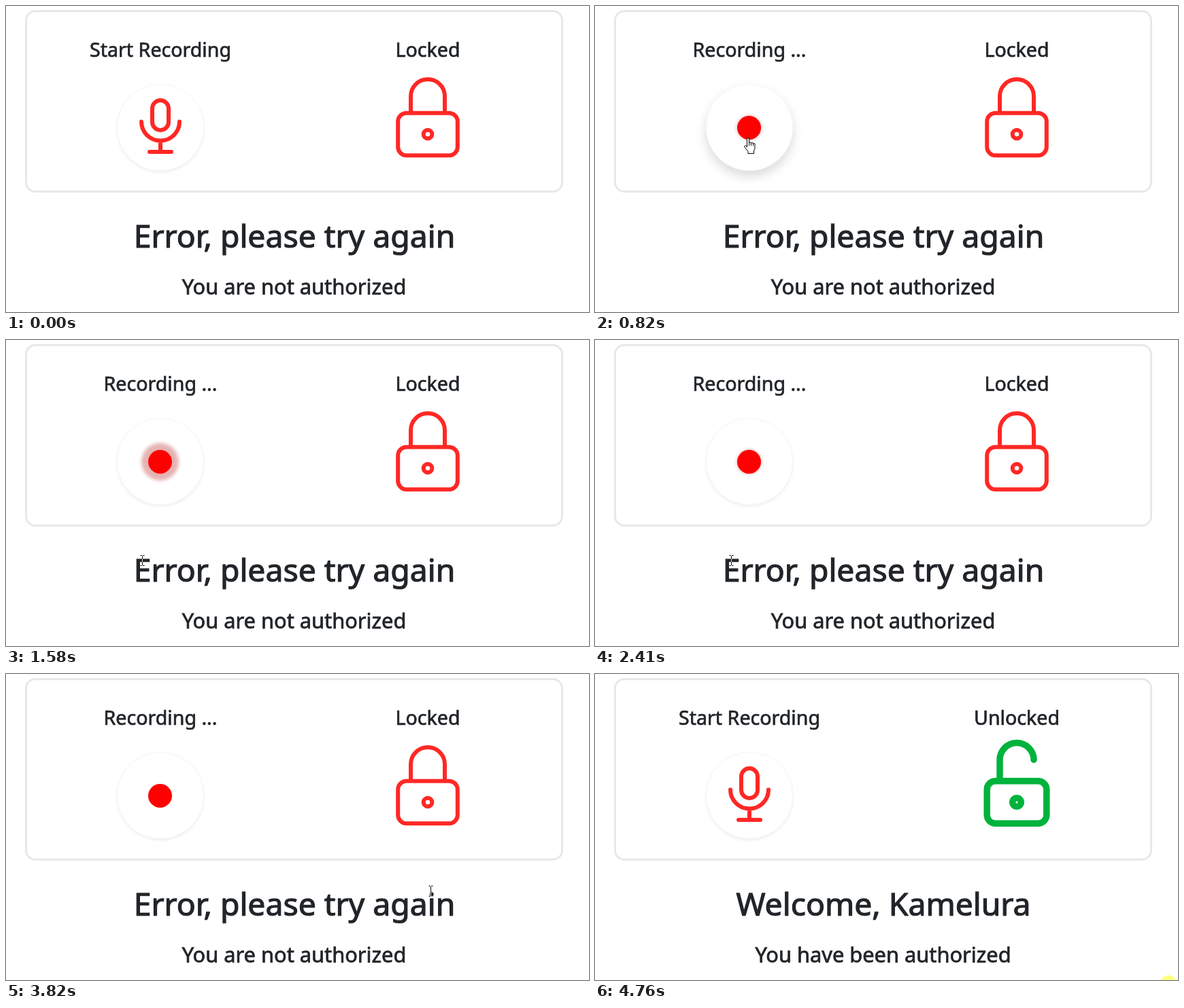
An HTML page that plays this animation: 857 px wide and 451 px high, repeating every 4820 ms.

```html
<!DOCTYPE html>
<html lang="en">
<head>
<meta charset="utf-8">
<title>Voice lock</title>
<style>
  html, body { margin: 0; width: 100%; height: 100%; overflow: hidden; background: #fff; }
  body { position: relative; }
  div, svg { position: absolute; box-sizing: border-box; }
  #card { left: 28px; top: 6px; width: 791px; height: 269px; border: 3px solid #e8e8e8; border-radius: 15px; }
  #button { left: 163px; top: 115px; width: 128px; height: 128px; border-radius: 50%; border: 1px solid #f6f6f6; }
  #dot { left: 209px; top: 162px; width: 35px; height: 35px; border-radius: 50%; background: #f00; }
  svg { left: 0; top: 0; }
  #beam { mix-blend-mode: difference; }
  /* the thin outline gives a medium weight */
  text { font: 28.6px "Noto Sans", "Open Sans", sans-serif; fill: #212529; stroke: #212529; stroke-width: .025em; text-anchor: middle; }
  #heading { font-size: 46.3px; }
  #detail { font-size: 30.8px; }
  .icon { fill: none; stroke: #ff2825; stroke-width: 6; stroke-linecap: round; }
  #open { stroke: #00b33c; stroke-width: 9.5; }
</style>
</head>
<body>
<div id="card"></div>
<div id="button"></div>
<div id="dot"></div>
<svg width="857" height="451">
  <defs>
    <g id="body">
      <rect x="576.200" y="157.800" width="87.600" height="62.400" rx="12.500"/>
      <circle cx="620" cy="189" r="6.300"/>
    </g>
  </defs>
  <text id="recordLabel" x="227" y="75"></text>
  <text id="lockLabel" x="620" y="75"></text>
  <text id="heading" x="424" y="356"></text>
  <text id="detail" x="423.500" y="425"></text>
  <g id="mic" class="icon">
    <rect x="215" y="139" width="24" height="44" rx="12"/>
    <path d="M199 170.500a28 28 0 0 0 56 0M227 199V215M211 215H243"/>
  </g>
  <g id="closed" class="icon">
    <path d="M595 157V133a25 25 0 0 1 50 0V157"/>
    <use href="#body"/>
  </g>
  <g id="open" class="icon">
    <path d="M595 157V126.500a25 25 0 0 1 50 0"/>
    <use href="#body"/>
  </g>
  <circle id="highlight" cx="843" cy="456" r="12" fill="#ffff80"/>
</svg>
<svg id="beam" width="857" height="451">
  <path id="text" d="M-3 -7.500H-1L0 -6.500L1 -7.500H3M0 -6.500V6.500M-3 7.500H-1L0 6.500L1 7.500H3" fill="none" stroke="#fff"/>
</svg>
<svg width="857" height="451" fill="#fff" stroke="#000" stroke-linejoin="round">
  <path id="arrow" d="M.5 .5V16.500L4 13L6.500 18.500L9 17.500L6.500 12H11.500Z"/>
  <path id="hand" d="M-1.500 14V2q0 -1.500 1.500 -1.500t1.500 1.500V8q0 -1 1.500 -1t1.500 1.500q0 -1 1.500 -1t1.500 1.500q0 -1 1.500 -.500t1 1.500V16L8.500 20V23.500H0V20.500L-5 14q-1 -2 .500 -2.500q1.500 0 3 2.500ZM1.500 8V12M4.500 8.500V12M7.500 9V12"/>
</svg>
<script>
const LOOP = 4820, PULSE = 1580;
const RECORD_START = 790, RECORD_END = 3960, UNLOCK = 4360, HIGHLIGHT = 4760;

// time, x, y of the pointer
const path = [
  [190, 646, 424], [330, 470, 350], [470, 310, 275], [600, 212, 226], [690, 225, 194],
  [1090, 225, 194], [1300, 200.5, 325], [3390, 200.5, 325], [3890, 692, 319],
  [3960, 740, 320], [4160, 805, 452]
];
const $ = id => document.getElementById(id);
const show = (id, on) => $(id).style.display = on ? "" : "none";
const clamp = v => Math.max(0, Math.min(1, v));

function pointerAt(t) {
  const i = path.findIndex(p => p[0] > t);
  if (i < 1) return null;
  const [t0, x0, y0] = path[i - 1], [t1, x1, y1] = path[i];
  const k = (t - t0) / (t1 - t0);
  return { x: x0 + (x1 - x0) * k, y: y0 + (y1 - y0) * k };
}

function pointerKind({ x, y }) {
  if (Math.hypot(x - 227, y - 179) < 64) return "hand";
  const onHeading = y > 310 && y < 370 && x > 188 && x < 660;
  const onDetail = y > 396 && y < 434 && x > 258 && x < 589;
  return onHeading || onDetail ? "text" : "arrow";
}

function drawPointer(t) {
  const pointer = pointerAt(t), kind = pointer && pointerKind(pointer);
  for (const id of ["arrow", "hand", "text"]) show(id, id === kind);
  if (pointer) {
    const x = Math.floor(pointer.x) + (kind === "text" ? .5 : 0);
    $(kind).setAttribute("transform", `translate(${x} ${Math.round(pointer.y)})`);
  }
  $("button").style.boxShadow = kind === "hand"
    ? "0 8px 16px rgba(0,0,0,.15)" : "0 2px 4px rgba(0,0,0,.075)";
}

function render(t) {
  const recording = t >= RECORD_START && t < RECORD_END, unlocked = t >= UNLOCK;
  $("recordLabel").textContent = recording ? "Recording ..." : "Start Recording";
  $("lockLabel").textContent = unlocked ? "Unlocked" : "Locked";
  $("heading").textContent = unlocked ? "Welcome, Kamelura" : "Error, please try again";
  $("detail").textContent = unlocked ? "You have been authorized" : "You are not authorized";
  show("mic", !recording);
  show("dot", recording);
  show("closed", !unlocked);
  show("open", unlocked);
  show("highlight", t >= HIGHLIGHT);

  // the ring grows for 65% of the pulse, then fades until 90%
  const phase = (t - RECORD_START) / PULSE % 1;
  const spread = 13 * clamp(phase / .65), alpha = .3 * clamp((.9 - phase) / .25);
  $("dot").style.boxShadow = `0 0 5px ${spread}px rgba(173,0,0,${alpha})`;
  drawPointer(t);
}

function tick() {
  render(performance.now() % LOOP);
  requestAnimationFrame(tick);
}
tick();
</script>
</body>
</html>
```
